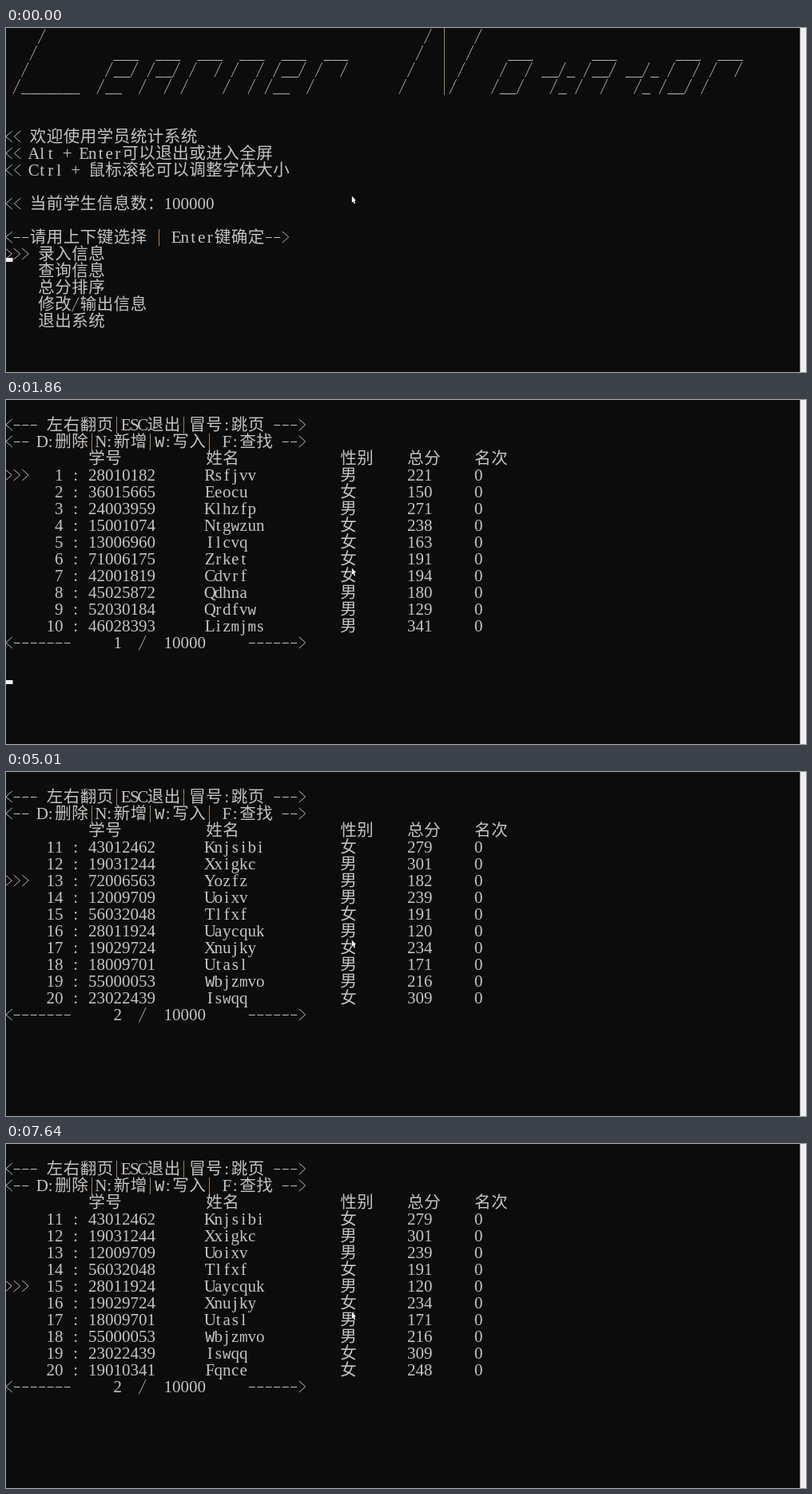
Animation of 1001 by 431 pixels, one loop 7.77 s. Source, as an HTML page with a canvas:

```html
<!DOCTYPE html>
<html lang="zh-CN">
<head>
<meta charset="utf-8">
<title>Console menu</title>
<style>
  html, body { margin: 0; width: 100%; height: 100%; overflow: hidden; background: #0c0c0c; }
  canvas { display: block; }
</style>
</head>
<body>
<canvas id="stage" width="1001" height="431"></canvas>
<script>
const ctx = document.getElementById('stage').getContext('2d');
const LOOP = 7770, CELL = 10.5, LEFT = -2, LINE = 21;
const INK = '#c4c4c4';
const SERIF = '21px "Liberation Serif", serif';
const MONO = '"Liberation Mono", monospace';
const HAN = '300 20.5px "Noto Sans CJK SC", "Noto Sans CJK", sans-serif';

// Console symbols as strokes: colour, then points inside the cell
const STROKES = {
  '/': ['#b3a79b', 0.4, 19.5, 9.2, 1],
  '|': ['#a08168', 4.5, 0, 4.5, 21],
  '_': ['#b4b4b4', 0, 19.5, CELL, 19.5],
  '-': ['#bcc2c8', 1.2, 10.5, 9.2, 10.5],
  '<': ['#b0bcc8', 9.8, 3, 1.8, 10, 9.8, 17],
  '>': ['#bebbb6', 1.2, 3, 9.2, 10, 1.2, 17]
};

// Banner letters: three text rows, the last one shifted left by one cell
const GLYPHS = {
  a: [' ___', '/__/', '/  /'],
  e: [' ___', '/__/', '/__'],
  n: [' ___', '/  /', '/  /'],
  o: [' ___', '/  /', '/__/'],
  r: [' ___', '/  /', '/'],
  t: ['', '__/_', '  /_']
};

const MENU = ['录入信息', '查询信息', '总分排序', '修改/输出信息', '退出系统'];

const students = `28010182 Rsfjvv 男 221
36015665 Eeocu 女 150
24003959 Klhzfp 男 271
15001074 Ntgwzun 女 238
13006960 Ilcvq 女 163
71006175 Zrket 女 191
42001819 Cdvrf 女 194
45025872 Qdhna 男 180
52030184 Qrdfvw 男 129
46028393 Lizmjms 男 341
43012462 Knjsibi 女 279
19031244 Xxigkc 男 301
72006563 Yozfz 男 182
12009709 Uoixv 男 239
56032048 Tlfxf 女 191
28011924 Uaycquk 男 120
19029724 Xnujky 女 234
18009701 Utasl 男 171
55000053 Wbjzmvo 男 216
23022439 Iswqq 女 309
19010341 Fqnce 女 248`.split('\n').map(line => line.split(' '));
const remaining = students.filter((s, i) => i !== 12);

const menu = () => drawMenu();
const first = () => drawTable(students, 1);
const second = () => drawTable(students, 2);
const edited = () => drawTable(remaining, 2);

// start time, screen, row of the pointer, row of the caret (0 = hidden)
const steps = [
  [0, menu, 13, 13], [70, menu, 13, 18], [270, menu, 13, 0],
  [600, menu, 14, 18], [800, menu, 14, 0], [930, menu, 15, 18],
  [1260, menu, 15, 0], [1790, menu, 16, 16],
  [1860, first, 4, 16], [2330, first, 4, 0],
  [2610, second, 4, 16], [2880, second, 4, 0], [3410, second, 4, 16],
  [3480, second, 5, 16], [3680, second, 6, 16], [3950, second, 6, 0],
  [4480, second, 6, 16], [5010, second, 6, 0],
  [5490, edited, 6, 16], [5560, edited, 6, 0], [6090, edited, 7, 0],
  [6290, edited, 8, 16], [6560, edited, 8, 0], [7090, edited, 8, 16],
  [7640, edited, 8, 0]
];

function stroke([color, ...pts], x, y) {
  ctx.strokeStyle = color;
  ctx.beginPath();
  for (let i = 0; i < pts.length; i += 2) ctx.lineTo(x + pts[i], y + pts[i + 1]);
  ctx.stroke();
}

// Letters too broad for a cell come from the monospaced face
function fontFor(ch, span) {
  if (span === 2) return HAN;
  if (/[MW]/.test(ch)) return '20px ' + MONO;
  return /[mw]/.test(ch) ? '17.5px ' + MONO : SERIF;
}

// Writes text on the character grid; Han characters take two cells
function put(row, col, text) {
  const y = row * LINE;
  for (const ch of String(text)) {
    const span = ch.codePointAt(0) > 0x2e80 ? 2 : 1;
    const x = LEFT + col * CELL;
    if (STROKES[ch]) {
      stroke(STROKES[ch], ch === '|' ? Math.floor(x) : x, y);
    } else if (ch !== ' ') {
      ctx.font = fontFor(ch, span);
      ctx.fillStyle = INK;
      ctx.fillText(ch, x + span * CELL / 2, y + 17);
    }
    col += span;
  }
}

function putWord(col, word) {
  [...word].forEach((ch, i) => {
    GLYPHS[ch].forEach((text, r) => put(r + 1, col + i * 5 - (r === 2), text));
  });
}

function drawBanner() {
  for (let r = 0; r < 4; r++) {
    put(r, 4 - r, '/');
    put(r, 50 - r, '/');
    put(r, 52, '|');
    put(r, 56 - r, '/');
  }
  put(3, 2, '_______');
  putWord(12, 'earner');
  putWord(59, 'otator');
}

function drawMenu() {
  drawBanner();
  put(6, 0, '<< 欢迎使用学员统计系统');
  put(7, 0, '<< Alt + Enter可以退出或进入全屏');
  put(8, 0, '<< Ctrl + 鼠标滚轮可以调整字体大小');
  put(10, 0, '<< 当前学生信息数：100000');
  put(12, 0, '<--请用上下键选择 | Enter键确定-->');
  MENU.forEach((item, i) => put(13 + i, 4, item));
}

function drawTable(list, page) {
  const cols = [10, 24, 40, 48, 56];
  const start = (page - 1) * 10;
  put(1, 0, '<--- 左右翻页|ESC退出|冒号:跳页 --->');
  put(2, 0, '<-- D:删除|N:新增|W:写入| F:查找 -->');
  ['学号', '姓名', '性别', '总分', '名次'].forEach((h, i) => put(3, cols[i], h));
  list.slice(start, start + 10).forEach((student, i) => {
    put(4 + i, 5, String(start + i + 1).padStart(2) + ' :');
    [...student, 0].forEach((value, k) => put(4 + i, cols[k], value));
  });
  put(14, 0, `<-------     ${page}  /  10000     ------>`);
}

function drawMouse(x, y) {
  ctx.beginPath();
  [[0, 0], [0, 8.5], [1.7, 7], [3, 10], [4.3, 9.4], [3.1, 6.4], [5, 5.4]]
    .forEach(([dx, dy]) => ctx.lineTo(x + dx, y + dy));
  ctx.closePath();
  ctx.strokeStyle = '#000';
  ctx.stroke();
  ctx.fillStyle = '#fff';
  ctx.fill();
}

function draw([, screen, pointer, caret]) {
  ctx.fillStyle = '#0c0c0c';
  ctx.fillRect(0, 0, 1001, 431);
  screen();
  put(pointer, 0, '>>>');
  if (caret) {
    ctx.fillStyle = '#f2f2f2';
    ctx.fillRect(0, caret * LINE + 15, 8.5, 5);
  }
  drawMouse(432.8, 210.5);
  ctx.fillStyle = '#f0f0f0';
  ctx.fillRect(993.5, 0, 7.5, 431);
}

ctx.textAlign = 'center';
ctx.lineWidth = 1;
const origin = performance.now();
let shown = null;

function tick() {
  const t = (performance.now() - origin) % LOOP;
  const step = steps.filter(s => s[0] <= t).pop();
  if (step !== shown) draw(shown = step);
  requestAnimationFrame(tick);
}
tick();
</script>
</body>
</html>
```
